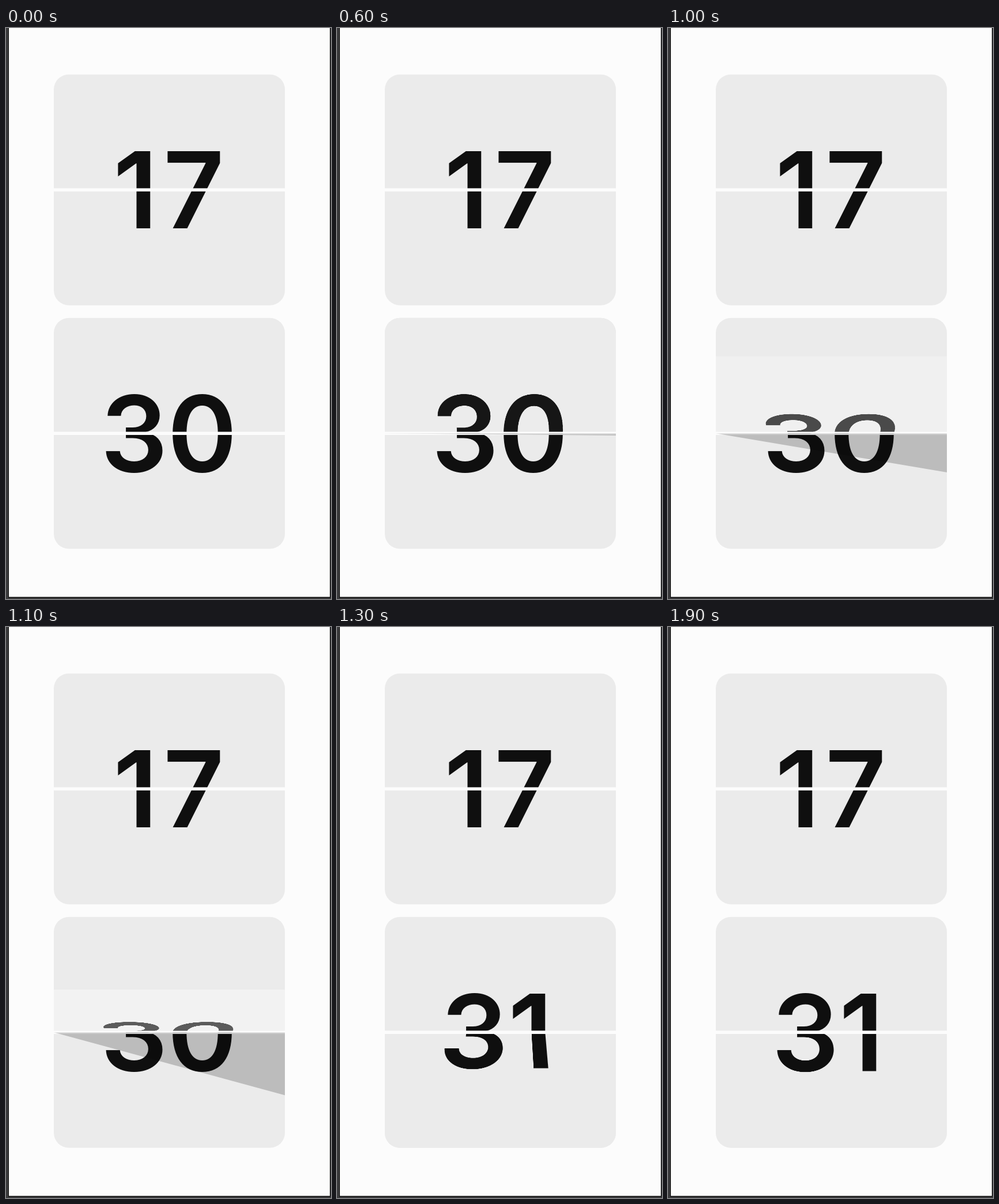
Recreate the animation shown at these times as an HTML page with a canvas. Size 564 by 992 pixels, loop 2000 ms.

```html
<!DOCTYPE html>
<html lang="en">
<head>
<meta charset="utf-8">
<title>Flip clock</title>
<style>
  html, body { margin: 0; width: 100%; height: 100%; overflow: hidden; background: #3a3a3c; }
  canvas { display: block; width: 564px; height: 992px; }
</style>
</head>
<body>
<canvas id="stage" width="564" height="992"></canvas>
<script>
const W = 564, H = 992, LOOP = 2000, STEP = 100;
const PAPER = '#fcfcfc', CARD = '#ebebeb', INK = '#0f0f0f';
const LEFT = 83, SIZE = 401, HALF = SIZE / 2, RADIUS = 26, MID = LEFT + HALF;
const HOURS = 281.2, MINUTES = 704.25;   // hinge heights
const GAP = 5.5, BASELINE = 67.2, DEPTH = 520;
const LIFT = 482, DROP = 1200;           // flap leaves the top, passes the hinge
const FONT = '600 183.5px Inter, "Liberation Sans", sans-serif';
// left edge of the ink of each digit
const INK_LEFT = { 17: [194, 280], 30: [173, 289], 31: [189, 305] };

const ctx = document.getElementById('stage').getContext('2d');

function cardPath(c, hinge) {
  c.beginPath();
  c.roundRect(LEFT, hinge - HALF, SIZE, SIZE, RADIUS);
}

function drawFace(c, hinge, text) {
  c.fillStyle = CARD;
  cardPath(c, hinge);
  c.fill();
  c.fillStyle = INK;
  c.font = FONT;
  [...text].forEach((digit, i) => {
    const bearing = c.measureText(digit).actualBoundingBoxLeft;
    c.fillText(digit, INK_LEFT[text][i] + bearing, hinge + BASELINE);
  });
}

function makeFace(text) {
  const face = document.createElement('canvas');
  face.width = SIZE * 2;
  face.height = SIZE * 2;
  const c = face.getContext('2d');
  c.scale(2, 2);
  c.translate(-LEFT, HALF - MINUTES);
  drawFace(c, MINUTES, text);
  return face;
}

const oldFace = makeFace('30'), newFace = makeFace('31');

function inRect(y, h, draw) {
  ctx.save();
  ctx.beginPath();
  ctx.rect(0, y, W, h);
  ctx.clip();
  draw();
  ctx.restore();
}

function drawGap(hinge, height = GAP) {
  ctx.fillStyle = PAPER;
  ctx.fillRect(LEFT - 1, hinge - GAP / 2, SIZE + 2, height);
}

// Half card tilted toward the viewer, drawn row by row; side is -1 above the hinge, 1 below.
function drawFlap(face, side, angle, glow) {
  const cos = Math.cos(angle), lean = Math.sin(angle) / DEPTH;
  const reach = HALF * cos / (1 - HALF * lean);
  ctx.save();
  cardPath(ctx, MINUTES);
  ctx.clip();
  inRect(side < 0 ? MINUTES - reach : MINUTES, reach, () => {
    const from = Math.floor(side < 0 ? MINUTES - reach : MINUTES);
    const to = Math.ceil(side < 0 ? MINUTES : MINUTES + reach);
    for (let row = from; row < to; row++) {
      const v = Math.max(0, side * (row + 0.5 - MINUTES));
      const q = cos + v * lean;
      const y = Math.min(HALF - 0.5, v / q);
      const width = SIZE / (1 - y * lean);
      const tall = Math.max(0.5, cos / (q * q));
      const top = Math.max(0, Math.min(SIZE - tall, HALF + side * y - tall / 2));
      ctx.drawImage(face, 0, top * 2, SIZE * 2, tall * 2, MID - width / 2, row, width, 1);
    }
    ctx.fillStyle = `rgba(255,255,255,${glow})`;
    ctx.fillRect(0, 0, W, H);
  });
  ctx.restore();
}

function drawShadow(fall) {
  ctx.save();
  cardPath(ctx, MINUTES);
  ctx.clip();
  ctx.fillStyle = 'rgba(0,0,0,0.2)';
  ctx.beginPath();
  ctx.moveTo(LEFT, MINUTES);
  ctx.lineTo(LEFT + SIZE, MINUTES);
  ctx.lineTo(LEFT + SIZE, MINUTES + fall);
  ctx.fill();
  ctx.restore();
}

function drawMinutes(t) {
  const upper = t < LIFT ? '30' : '31';
  const lower = t <= DROP ? '30' : '31';
  inRect(MINUTES - HALF - 1, HALF + 1, () => drawFace(ctx, MINUTES, upper));
  inRect(MINUTES, HALF + 1, () => drawFace(ctx, MINUTES, lower));
  drawGap(MINUTES);

  if (t >= LIFT && t <= DROP) {
    const p = (t - LIFT) / (DROP - LIFT);
    const angle = p * 89 * Math.PI / 180;
    drawShadow(118 * (1 - Math.cos(angle)) + 206 * p ** 16);
    drawFlap(oldFace, -1, angle, 0.4 * p ** 1.5);
    drawGap(MINUTES, GAP / 2);
  } else if (t > DROP) {
    const angle = Math.PI / 2 * 3 ** (-(t - DROP) / 100);
    drawFlap(newFace, 1, angle, 0);
    drawGap(MINUTES);
  }
}

function drawFrame(t) {
  ctx.fillStyle = '#3a3a3c';
  ctx.fillRect(0, 0, W, H);
  ctx.fillStyle = '#0c0c0c';
  ctx.fillRect(4, 0, 559, 990);
  ctx.fillStyle = PAPER;
  ctx.fillRect(5, 0, 557, 988.4);
  drawFace(ctx, HOURS, '17');
  drawGap(HOURS);
  drawMinutes(t);
}

function tick() {
  const t = performance.now() % LOOP;
  drawFrame(Math.floor(t / STEP) * STEP);
  requestAnimationFrame(tick);
}
tick();
</script>
</body>
</html>
```
